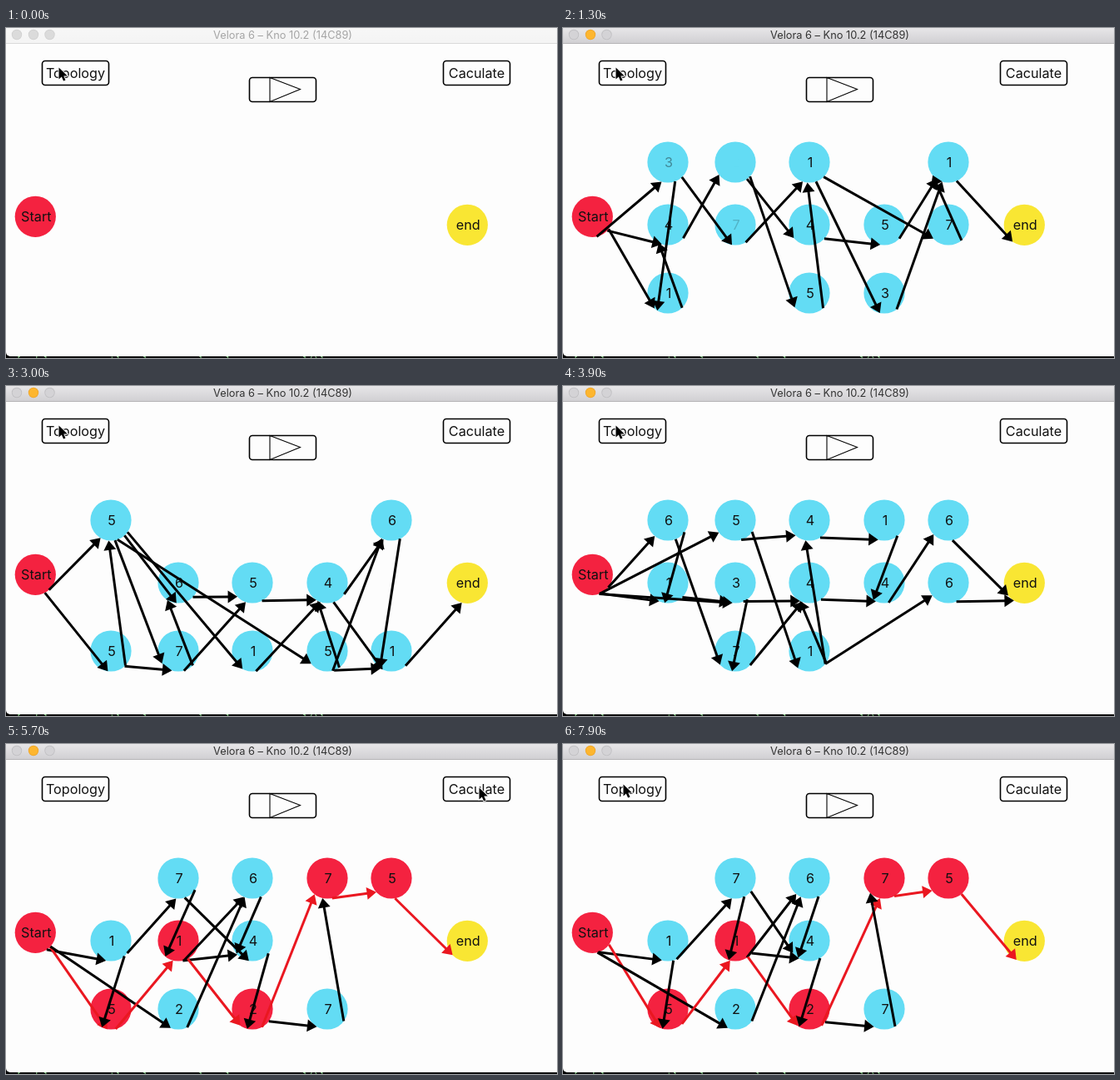
Write an HTML page with a canvas that moves like this. It is 662 by 396 pixels and loops after 8000 ms.

```html
<!DOCTYPE html>
<html lang="en">
<head>
<meta charset="utf-8">
<title>Topology</title>
<style>
html, body { margin: 0; width: 100%; height: 100%; overflow: hidden; background: #000; }
canvas { display: block; }
</style>
</head>
<body>
<canvas id="stage" width="662" height="396"></canvas>
<script>
const ctx = document.getElementById('stage').getContext('2d');
const LOOP = 8000, FOCUS = 500, RADIUS = 24.6;
const RED = '#f42240', BLUE = '#63dcf4', YELLOW = '#f9e633';
const COLS = [126, 207, 296, 386, 463], ROWS = [161, 236, 318];

// Grid cells are named a to o, column by column; s is the start and z the end.
const CELLS = 'abcdefghijklmno';
const CRITICAL = 'sceijmz';
const last = {
  labels: '.157126427.75..',
  edges: 'sb sc sf bd bc ce de dh eg eh ei fg gh hi ij il lj jm mz'
};

// One label per cell, '.' for an empty one; each edge is a pair of cells.
const scenes = [
  { at: 1000, labels: '34127.145.5317.', fresh: 'aed',
    edges: 'sa sb sc ac ae bd cb dh di eg gn gl hk ig km lm nm mz' },
  { at: 2200, labels: '5.5.67.51.456.1',
    edges: 'sa sc ae af al ai ca cf eh fh fe hk ik km ko lk lm lo mo oz' },
  { at: 3400, labels: '61.53744114.66.',
    edges: 'sa sd se sb ab af be dg di eh ef fh gj hk ig ih in jk km mz nz' },
  { at: 4200, ...last },
  { at: 5700, ...last, path: CRITICAL },
  { at: 7000, ...last, path: CRITICAL }
];

const clamp = v => Math.max(0, Math.min(1, v));
const ease = v => (v = clamp(v), v * v * (3 - 2 * v));
const mix = (a, b, k) => a + (b - a) * k;

function random(seed) {
  const v = Math.sin(seed * 12.9898) * 43758.5453;
  return v - Math.floor(v);
}

function place(name) {
  if (name === 's') return [35.3, 226.3];
  if (name === 'z') return [554.3, 236.3];
  const i = CELLS.indexOf(name);
  return [COLS[Math.floor(i / 3)], ROWS[i % 3]];
}

function text(s, x, y, color = '#111', font = '16.2px Inter, sans-serif', align = 'center') {
  ctx.font = font;
  ctx.textAlign = align;
  ctx.fillStyle = color;
  ctx.fillText(s, x, y);
}

function disc(x, y, r, fill) {
  ctx.beginPath();
  ctx.arc(x, y, r, 0, 7);
  ctx.fillStyle = fill;
  ctx.fill();
}

function poly(points) {
  ctx.beginPath();
  points.forEach(p => ctx.lineTo(...p));
  ctx.closePath();
}

function node(name, fill, label, alpha = 1) {
  const [x, y] = place(name);
  disc(x, y, RADIUS, fill);
  ctx.globalAlpha = alpha;
  text(label, x + 1, y + 6);
  ctx.globalAlpha = 1;
}

function arrow([x1, y1], [x2, y2], color) {
  ctx.save();
  ctx.translate(x2, y2);
  ctx.rotate(Math.atan2(y2 - y1, x2 - x1));
  ctx.strokeStyle = ctx.fillStyle = color;
  ctx.lineWidth = 3;
  ctx.beginPath();
  ctx.moveTo(-Math.hypot(x2 - x1, y2 - y1), 0);
  ctx.lineTo(-9, 0);
  ctx.stroke();
  poly([[0, 0], [-11.5, -7.5], [-11.5, 7.5]]);
  ctx.fill();
  ctx.restore();
}

function box(x, y) {
  ctx.lineWidth = 1.6;
  ctx.strokeStyle = '#000';
  ctx.beginPath();
  ctx.roundRect(x, y, 80, 29, 3.5);
  ctx.stroke();
}

function drawWindow(active) {
  ctx.fillStyle = '#000';
  ctx.fillRect(0, 0, 662, 396);
  text('[modular component] analog canvas] analog page parcel()]', 12, 402,
    '#9fe8a0', '11px "DejaVu Sans Mono", monospace', 'left');
  ctx.fillStyle = '#fdfdfd';
  ctx.beginPath();
  ctx.roundRect(0, -10, 680, 404, 5);
  ctx.fill();

  const bar = ctx.createLinearGradient(0, 0, 0, 18);
  bar.addColorStop(0, active ? '#e7e6e8' : '#f7f7f7');
  bar.addColorStop(1, active ? '#d1d0d3' : '#f4f4f4');
  ctx.fillStyle = bar;
  ctx.fillRect(0, 0, 662, 18);
  ctx.fillStyle = active ? '#b5b4b7' : '#dadada';
  ctx.fillRect(0, 18, 662, 1);
  [13, 33, 52.5].forEach((x, i) => {
    const lit = active && i === 1;
    disc(x, 8, 6.2, lit ? '#eda52c' : active ? '#bfbec1' : '#d0d0d0');
    disc(x, 8, 5.4, lit ? '#fdb62f' : active ? '#d4d3d6' : '#dbdbdb');
  });
  text('Velora 6 – Kno 10.2 (14C89)', 332.5, 13, active ? '#333' : '#a5a5a5',
    '12.8px Inter, sans-serif');
}

function drawControls() {
  box(43.5, 39.5);
  box(525.5, 39.5);
  box(292.5, 59.5);
  text('Topology', 83.5, 60);
  text('Caculate', 565.5, 60);
  ctx.lineWidth = 1.1;
  poly([[317, 59.5], [353.5, 73.5], [317, 88.5]]);
  ctx.stroke();
}

function drawNodes({ labels, fresh = '', path = '' }, t) {
  [...labels].forEach((label, i) => {
    if (label === '.') return;
    const name = CELLS[i], order = fresh.indexOf(name);
    const alpha = order < 0 ? 1 : clamp((t - 1200 - order * 50) / 250);
    node(name, path.includes(name) ? RED : BLUE, label, alpha);
  });
}

// Arrows leave from the lower right of a rim and land on the lower left.
function drawEdges({ at, edges, path = '' }) {
  const rim = (name, angle) => {
    const [x, y] = place(name);
    return [x + RADIUS * Math.cos(angle), y + RADIUS * Math.sin(angle)];
  };
  edges.split(' ').forEach((edge, i) => {
    const leave = mix(0.6, 1.4, random(at + i));
    const land = mix(1.65, 2.5, random(at + i + 50));
    arrow(rim(edge[0], leave), rim(edge[1], land), path.includes(edge) ? '#ea1720' : '#000');
  });
}

function drawCursor(t) {
  const go = ease((t - 4400) / 500), back = ease((t - 7250) / 500);
  ctx.save();
  ctx.translate(mix(mix(63.5, 568.5, go), 72.5, back), mix(mix(47.5, 52.5, go), 48.5, back));
  poly([[0, 0], [0, 14], [3.3, 11], [5.6, 16], [8, 15], [5.8, 10], [10.3, 10]]);
  ctx.lineWidth = 1.6;
  ctx.strokeStyle = '#fff';
  ctx.stroke();
  ctx.fillStyle = '#000';
  ctx.fill();
  ctx.restore();
}

function draw(now) {
  const t = now % LOOP;
  const scene = scenes.filter(s => s.at <= t).pop();
  drawWindow(t >= FOCUS);
  drawControls();
  node('s', RED, 'Start');
  node('z', YELLOW, 'end');
  if (scene) {
    drawNodes(scene, t);
    drawEdges(scene);
  }
  drawCursor(t);
  requestAnimationFrame(() => draw(performance.now() - start));
}

const start = performance.now();
draw(0);
</script>
</body>
</html>
```
